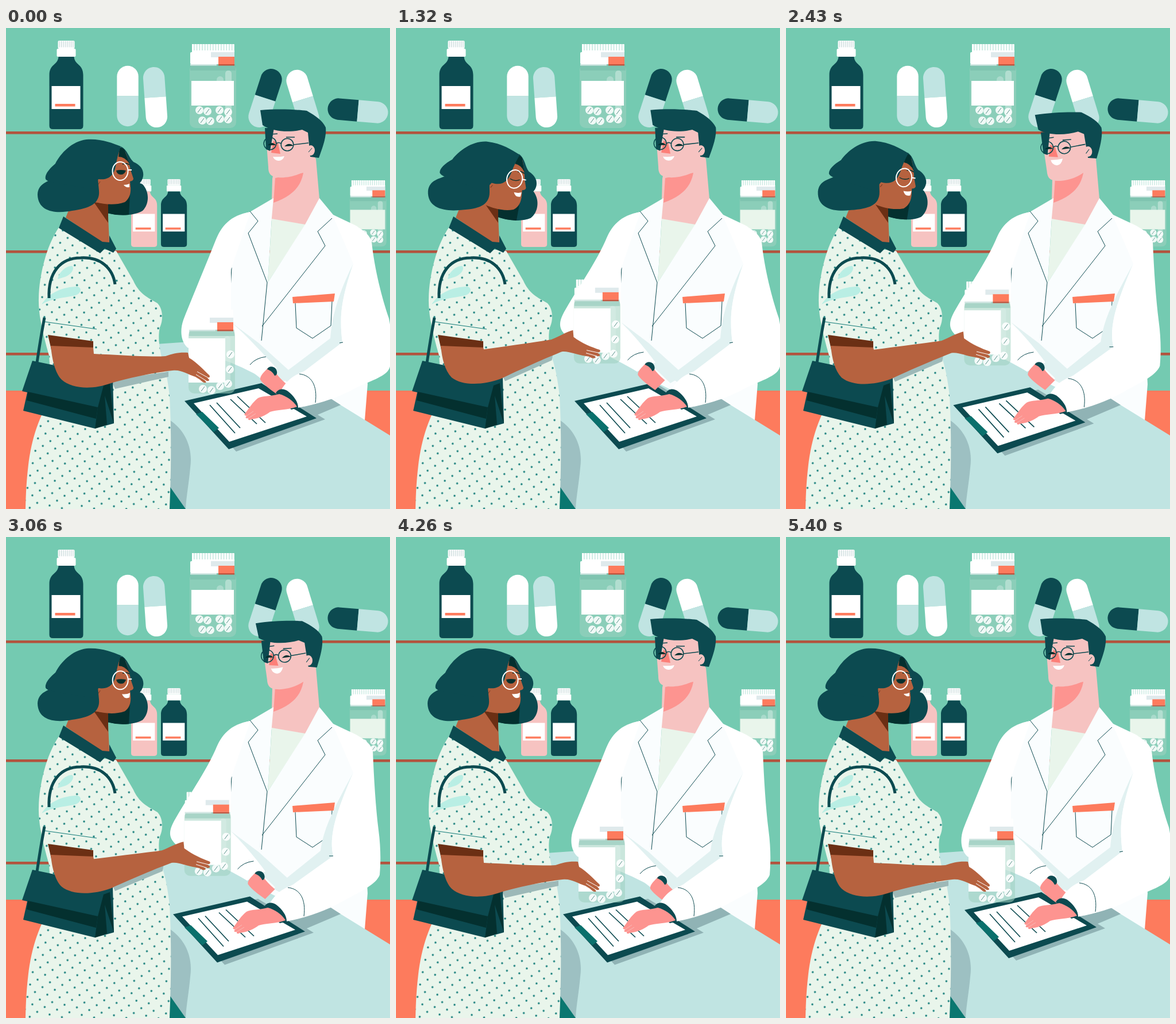
An HTML page that plays this animation: 669x837 px, repeating every 5.43 s.

```html
<!DOCTYPE html>
<html lang="en">
<head>
<meta charset="utf-8">
<title>At the pharmacy</title>
<style>
html, body { margin: 0; width: 100%; height: 100%; overflow: hidden; background: #74cab1; }
svg { display: block; width: 100%; height: 100%; }
</style>
</head>
<body>
<svg id="stage" viewBox="0 0 669 837"></svg>
<script>
const LOOP = 5430;
const TEAL = '#0c4a50', DEEP = '#04302f', MINT = '#c0e4e2', ORANGE = '#fd7b5d',
      DRESS = '#e9f5eb', SKIN = '#b6623f', PINK = '#f6c3c1', ROSE = '#fd9490',
      SHADE = '#e1f1f1', WHITE = '#fff';

const path = (d, fill, more = '') => `<path d="${d}" fill="${fill}" ${more}/>`;
const line = (d, color = TEAL, w = 1, more = '') =>
  `<path d="${d}" fill="none" stroke="${color}" stroke-width="${w}" ${more}/>`;
const rect = (x, y, w, h, fill, more = '') =>
  `<rect x="${x}" y="${y}" width="${w}" height="${h}" fill="${fill}" ${more}/>`;
const group = (id, body) => `<g id="${id}">${body}</g>`;

function bottle(x, y, s, color) {
  return `<g transform="translate(${x} ${y}) scale(${s})">` +
    rect(15, 0, 29, 14, WHITE, 'rx="2"') +
    line('M17 6H43', '#b9cfd0', 11, 'stroke-dasharray="1 2.4"') +
    rect(13, 14, 33, 14, WHITE, 'rx="2"') +
    path('M16 28H43C44 43 59 40 59 60V148Q59 154 53 154H6Q0 154 0 148V60C0 40 15 43 16 28Z', color) +
    rect(4, 79, 50, 40, WHITE) + rect(10, 110, 35, 4.5, ORANGE) + '</g>';
}

function capsule(x, y, angle, top, bottom) {
  return `<g transform="translate(${x} ${y}) rotate(${angle})">` +
    path('M-18.7 0V-34A18.7 18.7 0 0 1 18.7 -34V0Z', top) +
    path('M-18.7 0V34A18.7 18.7 0 0 0 18.7 34V0Z', bottom) + '</g>';
}

const pill = ([x, y]) =>
  `<circle cx="${x}" cy="${y}" r="7" fill="#fff" opacity=".87"/>` +
  line(`M${x - 3} ${y + 4}L${x + 3} ${y - 4}`, '#568f88', 1);

function jar(x, y, s, pills, label) {
  return `<g transform="translate(${x} ${y}) scale(${s})">` +
    rect(1, 34, 81, 112, '#9fd2c0', 'rx="10" opacity=".55"') +
    rect(2, 35, 79, 11, '#68b39f', 'opacity=".35"') +
    rect(63, 46, 11, 82, '#d9eee8', 'rx="5" opacity=".5"') +
    rect(48, 56, 12, 50, '#d9eee8', 'rx="6" opacity=".4"') +
    pills.map(pill).join('') + label +
    rect(5, 0, 74, 14, WHITE, 'rx="1.5" opacity=".6"') +
    line('M5 6H79', WHITE, 12, 'stroke-dasharray="3 1.7"') + rect(5, 11, 74, 3, WHITE) +
    rect(2, 14, 77, 21, WHITE, 'rx="2"') + rect(38, 14, 41, 9, '#dfeaec') +
    rect(2, 35, 46, 2.5, '#d3e7e4') + rect(51, 22, 28, 13, ORANGE) +
    rect(51, 35, 28, 2.5, '#c2543e') + '</g>';
}

const SHELF_PILLS = [[18,115],[32,117],[53,115],[68,118],[23,133],[37,134],[54,130],[68,131]];
const HAND_PILLS = [[26,138],[41,140],[56,133],[70,129],[73,104],[74,78]];

const DRESS_PATH = 'M92 347C70 380 58 430 57 470C56 500 65 535 75 570L80 640C50 690 36 735 34 837' +
  'H285C287 790 289 710 285 640C281 605 276 585 271 572C266 550 265 535 268 521' +
  'C274 508 274 490 264 479C245 468 232 462 222 440L192 388L164 385Z';

const background = rect(0, 0, 669, 837, '#74cab1') + rect(0, 631, 669, 206, ORANGE) +
  [180, 387, 565].map(y => rect(0, y, 669, 4.6, '#b2533e')).join('') +
  bottle(75.5, 22, 1, TEAL) +
  capsule(212, 118.5, 0, WHITE, MINT) + capsule(260, 120.5, -4, MINT, WHITE) +
  jar(319, 28, 1, SHELF_PILLS, rect(4, 64, 74, 43, WHITE)) +
  capsule(451.5, 122, 18, TEAL, MINT) + capsule(517, 124, -17, WHITE, MINT) +
  capsule(613, 144, -85, TEAL, MINT) +
  bottle(218, 263, .766, PINK) + bottle(270, 263, .766, TEAL) +
  jar(598, 265, .79, SHELF_PILLS, rect(2, 65, 77, 43, DRESS));

const manBody =
  path('M470 235L532 215L540 228L546 297L520 345L462 335L464 262Z', PINK) +
  path('M469 261L518 252C514 275 500 292 466 304Z', ROSE) +
  path('M463 332L522 342L456 443Z', DRESS) +
  path('M466 296L425 320C395 328 385 340 375 370L392 600L480 640L560 660L625 683L630 620L622 470L628 380' +
    'L612 345L570 325L546 296L521 342L456 443L463 330Z', '#fafdfe') +
  path('M392 512L440 548L502 604L478 618L430 572Z', SHADE) +
  line('M425 319L439 336L422 357L455 443L445 544M568 331L543 354L556 379L446 519M393 417L389 490') +
  path('M499 468L573 462L571 476L500 479Z', ORANGE) +
  line('M504 479L506 522L534 540L566 518L568 476');

const manHead =
  path('M452 176H528L538 222L530 240C520 255 490 262 474 260C460 259 457 252 457 242Z', PINK) +
  path('M451 174H467L460 214L453 211Z', TEAL) +
  path('M443 143C475 140 505 142 524 144C540 153 552 162 557 173C559 190 550 212 545 226L530 224' +
    'L526 182L516 177C495 182 465 181 447 169Z', TEAL) +
  `<ellipse cx="531" cy="213" rx="7" ry="9" fill="${PINK}"/>` + line('M527 216L533 209') +
  path('M466 196L474 201L478 219L462 217Z', '#fd7f78') +
  `<g fill="none" stroke="${TEAL}" stroke-width="1.6"><circle cx="460" cy="201" r="10.8"/>` +
  '<circle cx="490" cy="203" r="10.8"/><path d="M471 201Q475 198 479 201M501 203L527 200"/>' +
  '<path d="M461 185L473 184M488 190H503"/></g>' +
  path('M456 204Q464 196 470 204ZM485 206Q493 198 501 205Z', DEEP) +
  '<path id="manSmile" fill="#fff"/>';

const counter =
  path('M262 550L320 546L400 575L450 615L480 630L565 645L669 709V837H270Z', MINT) +
  path('M285 682C312 700 326 730 321 765C319 790 314 815 313 837H284Z', '#9dc0c2') +
  path('M284 796L313 837H284Z', '#0a7770') +
  path('M490 668L566 645L583 656L510 687Z', '#90b3b5');

const clipboard =
  path('M325 653L459 622L556 681L401 737Z', '#90b3b5') +
  path('M311 649L445 618L541 679L388 733Z', TEAL) +
  path('M327 653L440 627L524 676L389 720Z', WHITE) +
  path('M331 672L342 668L371 696L362 703Z', '#0a706c') +
  line('M355 656L399 705M367 652L408 696M391 646L437 689M403 641L452 687', TEAL, 1.7);

const leftHand =
  path('M456 592C448 600 442 606 443 612C450 622 462 630 473 638L490 621C480 612 475 607 470 600Z', ROSE) +
  path('M455 594C457 588 466 588 470 593C474 599 472 605 468 605C465 599 461 596 455 594Z', TEAL);

const rightHand =
  path('M470 635C475 627 484 627 491 632C501 640 509 650 509 661L497 664Z', TEAL) +
  path('M476 637C462 641 446 640 439 644C429 652 424 661 417 670Q413 674 419 675Q415 680 422 679' +
    'Q421 684 428 681C442 679 452 674 460 668C472 664 490 665 507 659C500 648 488 640 476 637Z', ROSE) +
  line('M419 675L431 667M422 679L435 671', PINK, .8);

const hairBack =
  path('M176 285V322C200 328 225 326 238 318C250 306 250 285 238 272L214 262Z', TEAL) +
  path('M176 290V322Q195 327 214 325L216 290Z', DEEP);

const face =
  path('M200 206C212 212 214 226 222 233C242 241 244 260 231 272L212 270Z', TEAL) +
  path('M196 208L208 216C213 230 216 240 217 247L222 262Q222 266 216 267L217 276C218 288 215 297 207 303' +
    'C190 309 172 307 156 303V263Z', SKIN) +
  path('M198 207L206 211L215 236Q207 224 196 224Z', DEEP) +
  line('M161 272L164 267', '#7c3c22') + line('M203 237Q209 234 215 238', DEEP, 1.5) +
  path('M192 248Q200 246 209 248Q206 256 199 255Q193 254 192 248Z', DEEP, 'id="eyeOpen"') +
  line('M192 251Q201 255 209 250', DEEP, 1.4, 'id="eyeShut"') +
  '<path id="smile" fill="#fff"/>';

const hairLow =
  path('M90 258C72 268 56 270 55 290C56 322 90 323 115 318C145 314 164 306 162 283L160 262Z', TEAL);

const hairTop =
  path('M200 206C185 200 165 192 140 194C115 197 95 218 86 236C74 246 67 256 69 263C74 270 90 268 100 272' +
    'L150 280L161 263C184 266 190 250 192 235C195 220 198 212 200 206Z', TEAL);

const glasses = line('M213 247H219', WHITE, 2) +
  '<ellipse cx="199" cy="249" rx="13.5" ry="16" fill="none" stroke="#fff" stroke-width="2"/>';

const dress =
  path(DRESS_PATH, DRESS) + path(DRESS_PATH, 'url(#dots)') +
  path('M90 437C92 425 104 414 115 414C121 419 112 430 103 433Z', '#b9eee4') +
  path('M62 481C75 460 100 450 125 450C134 453 130 464 118 466C100 470 80 470 62 481Z', '#b9eee4') +
  line('M66 511L158 524', '#0f7a77') +
  path('M100 328L168 372L180 373V361L192 384L187 391L172 384L164 392L92 348Z', TEAL);

const bag =
  line('M75 470C73 425 95 400 130 400C165 398 186 418 190 446', TEAL, 5) +
  line('M67 504C62 530 58 555 54 582', TEAL, 5) +
  path('M46 579L186 608L188 688L155 697L30 666L37 634L28 632Z', TEAL) +
  path('M38 633L160 660L157 680L36 648Z', DEEP) +
  path('M170 622L160 660L155 697L176 690L172 640L188 688L181 618Z', DEEP);

// Moving outlines have two poses with the same path structure.
const POSES = {
  arm: ['M78 553L152 556L153 567C200 569 250 573 278 571C290 567 300 564 317 565L319 574C333 582 345 596 354 604' +
    'Q357 608 351 609L354 612Q354 616 346 613L349 616Q346 620 338 612L330 607C315 602 305 594 290 596' +
    'C255 600 215 609 183 618C150 630 115 628 97 612C85 600 80 575 78 553Z',
    'M78 553L152 556L153 559C200 552 245 545 270 541C285 535 295 528 308 524L309 536C325 548 340 553 355 558' +
    'Q358 562 351 563L356 567Q354 571 345 568L348 571Q345 575 336 570L330 569C312 567 300 560 288 562' +
    'C255 576 215 594 183 610C150 622 115 622 97 608C85 596 80 575 78 553Z'],
  fingers: ['M353 609L333 598M349 614L331 603', 'M354 563.5L332 559M350 569L331 564'],
  armShade: ['M183 612L283 598L283 607L190 628Z', 'M183 600L273 566L271 577L190 614Z'],
  leftSleeve: ['M426 320C390 326 375 345 365 370C345 420 320 480 309 508C303 525 304 545 316 556' +
    'C340 566 388 576 441 606L472 592C450 570 420 535 392 512L392 420Z',
    'M426 320C390 326 375 345 365 370C345 415 305 470 290 500C283 515 285 525 296 535' +
    'C325 552 374 570 420 598L452 582C440 565 415 535 392 512L392 420Z'],
  rightShade: ['M605 410C585 470 580 500 586 547L520 597L490 616L476 607L565 540C568 500 580 460 605 410Z',
    'M605 410C575 480 562 520 570 555L500 605L480 620L466 612L548 546C552 510 572 470 605 410Z'],
  rightSleeve: ['M570 328C600 338 632 352 637 372C642 420 655 470 667 505C674 540 676 570 668 592' +
    'C662 606 640 612 610 626C585 640 555 652 508 661C505 645 495 632 478 632C490 612 500 605 520 597L586 547' +
    'C580 500 585 470 605 410Z',
    'M570 328C600 338 634 352 639 372C641 420 644 470 649 510C653 540 653 565 651 588' +
    'C645 604 620 616 590 632C565 646 535 660 488 669C485 653 475 640 458 640C470 620 480 613 500 605L570 555' +
    'C562 520 575 480 605 410Z'],
  hem: ['M581 548L587 547', 'M563 555L570 555'],
  manSmile: ['M465 224Q476 225 485 223Q482 231 475 231Q468 231 465 224Z',
    'M465 223Q476 224 486 222Q483 233 475 233Q467 232 465 223Z'],
  smile: ['M205 273Q211 273 215 271L215 277Q208 278 205 273Z', 'M202 273Q210 274 216 271L215 279Q206 283 202 273Z']
};

const blank = (id, fill) => path('', fill, `id="${id}"`);

document.getElementById('stage').innerHTML =
  '<defs><pattern id="dots" width="22" height="22" patternUnits="userSpaceOnUse" patternTransform="rotate(12)">' +
  '<g fill="#0f7a77"><circle cx="5" cy="5" r="1.7"/><circle cx="16" cy="16" r="1.7"/></g></pattern></defs>' +
  background + manBody + group('manHead', manHead) + counter +
  group('clipboard', clipboard) +
  blank('leftSleeve', WHITE) + blank('rightShade', SHADE) +
  group('leftHand', leftHand + line('M425 586Q435 574 453 572')) +
  blank('rightSleeve', WHITE) + line('', TEAL, 1, 'id="hem"') +
  group('rightHand', rightHand + line('M511 602C532 604 543 622 539 652')) +
  group('hairBack', hairBack) +
  path('M104 330L112 310L150 295L177 305L180 373L168 374Z', SKIN) +
  path('M153 303L178 306V339Z', '#6b2f14') +
  dress + group('face', face) + group('hairLow', hairLow) + group('hairTop', hairTop) +
  group('glasses', glasses) + blank('armShade', '#9db9b8') + bag +
  path('M73 534L152 545V560L79 560Z', '#6b2f14') +
  group('jar', jar(317, 490, 1, HAND_PILLS, rect(1, 50, 64, 77, WHITE))) +
  blank('arm', SKIN) + line('', WHITE, 1, 'id="fingers"');

const el = {};
document.querySelectorAll('#stage [id]').forEach(n => el[n.id] = n);

const ease = k => (1 - Math.cos(Math.PI * k)) / 2;

// keys: [time, value] pairs, eased between neighbours
function track(t, keys) {
  let [t0, v0] = keys[0];
  for (const [t1, v1] of keys) {
    if (t < t1) return v0 + (v1 - v0) * ease((t - t0) / (t1 - t0));
    t0 = t1; v0 = v1;
  }
  return v0;
}

function pose(id, k) {
  const [a, b] = POSES[id], to = b.match(/-?[\d.]+/g);
  let i = 0;
  el[id].setAttribute('d', a.replace(/-?[\d.]+/g, n => (+n + (to[i++] - n) * k).toFixed(2)));
}

const move = (id, x, y, turn = '') => el[id].setAttribute('transform', `translate(${x} ${y}) ${turn}`);

// Degrees each layer of her head turns in a full nod
const NOD = { hairBack: 7, face: 10, glasses: 11, hairLow: 5, hairTop: 11 };

function draw(t) {
  const lift = track(t, [[0, 0], [630, 1], [1950, .92], [3130, .85], [3810, 0]]);
  const nod = track(t, [[0, 0], [350, 0], [1400, 1], [2150, 1], [3150, 0]]);
  const tilt = track(t, [[0, 0], [1200, 0], [1740, -.25], [2350, 1], [2900, 1], [3650, -.25], [4200, 0]]);
  const left = track(t, [[0, 0], [450, 0], [1150, 1], [3400, 1], [4150, 0]]);
  const right = track(t, [[0, 0], [1740, 0], [2500, 1], [4500, 1], [5100, 0]]);
  const grin = track(t, [[0, 0], [900, 0], [1500, 1], [4600, 1], [5100, 0]]);

  for (const id of ['arm', 'fingers', 'armShade']) pose(id, lift);
  move('jar', -8.5 * lift, -54.5 * lift);

  for (const id in NOD) move(id, 0, 0, `rotate(${NOD[id] * nod} 130 296)`);
  const shut = nod > .8;
  el.eyeOpen.style.display = shut ? 'none' : '';
  el.eyeShut.style.display = shut ? '' : 'none';
  pose('smile', grin);

  move('manHead', -tilt, 2 * tilt, `rotate(${-4 * tilt} 530 265)`);
  pose('manSmile', Math.max(0, tilt));

  pose('leftSleeve', left);
  move('leftHand', -21.5 * left, -8 * left);
  for (const id of ['rightSleeve', 'rightShade', 'hem']) pose(id, right);
  move('rightHand', -20 * right, 8 * right);
  move('clipboard', -20 * right, 7.5 * right);
}

const start = performance.now();
function tick() {
  draw((performance.now() - start) % LOOP);
  requestAnimationFrame(tick);
}
tick();
</script>
</body>
</html>
```
